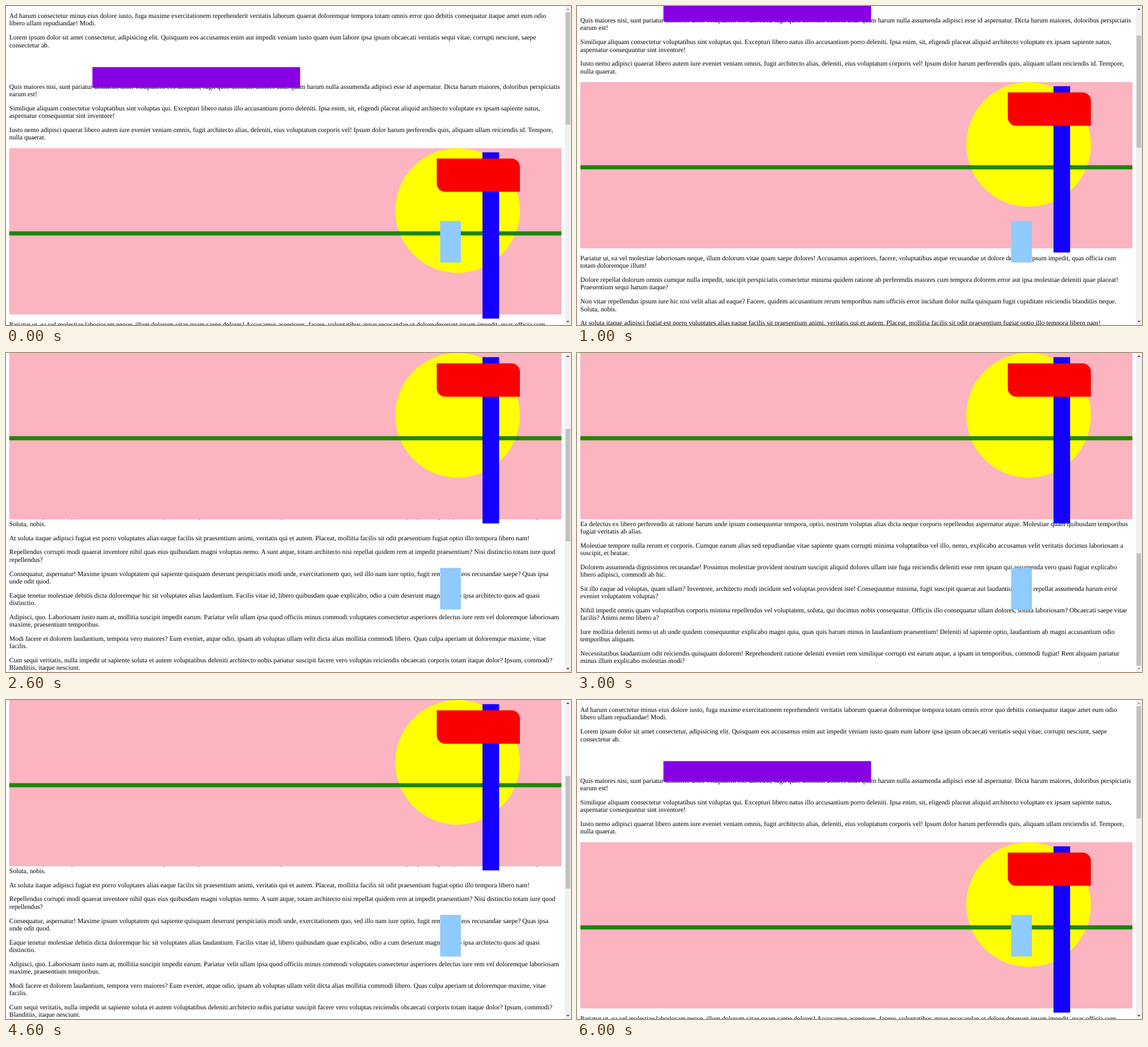
An HTML page for the animation above (7 s loop, 996 px wide and 562 px high).

```html
<!DOCTYPE html>
<html lang="la">
<head>
<meta charset="utf-8">
<title>Sticky and fixed boxes</title>
<style>
html, body { margin: 0; width: 100%; height: 100%; overflow: hidden; background: #fff; }
#stage {
  position: absolute; left: 0; top: 0; width: 1360px; height: 768px; overflow: hidden;
  transform: scale(.73235); transform-origin: 0 0;
  font: 16px/18px "Liberation Serif", "Times New Roman", serif; color: #000;
  text-rendering: geometricPrecision;
}
#page { position: absolute; left: 8px; top: 0; width: 1329px; white-space: nowrap; }
p { margin: 16px 0; }
.skip { margin-top: 484px; }
.relative { position: relative; left: 200px; top: 27px; width: 500px; height: 50px; background: #8700e3; }
.room { height: 400px; }
#sticky { position: absolute; left: 8px; top: 0; width: 1329px; height: 400px; background: #fbb4c0; }
#sticky div { position: absolute; }
.sun { right: 100px; top: 0; width: 300px; height: 300px; border-radius: 50%; background: #ff0; }
.line { left: 0; top: 200px; width: 100%; height: 10px; background: #218407; }
.post { right: 150px; top: 10px; width: 40px; height: 400px; background: #1400ff; }
.flag { right: 100px; top: 25px; width: 200px; height: 80px; border-radius: 0 20px; background: #fa0000; }
.fixed { position: absolute; left: 1045px; top: 517px; width: 50px; height: 100px; background: #8fcbfc; }
#bar { position: absolute; left: 1345px; top: 0; width: 15px; height: 768px; background: #f1f1f1; }
#thumb { position: absolute; left: 2px; top: 15px; width: 11px; height: 270px; background: #c1c1c1; }
#bar svg { position: absolute; left: 0; top: 0; }
</style>
</head>
<body>
<div id="stage">
  <div id="page">
    <p>Ad harum consectetur minus eius dolore iusto, fuga maxime exercitationem reprehenderit veritatis laborum quaerat doloremque tempora totam omnis error quo debitis consequatur itaque amet eum odio<br>libero ullam repudiandae! Modi.</p>
    <p>Lorem ipsum dolor sit amet consectetur, adipisicing elit. Quisquam eos accusamus enim aut impedit veniam iusto quam eum labore ipsa ipsum obcaecati veritatis sequi vitae, corrupti nesciunt, saepe<br>consectetur ab.</p>
    <div class="relative"></div>
    <p>Quis maiores nisi, sunt pariatur distinctio amet voluptatem eos laborum, fugit quos dolorum dolores alias quam harum nulla assumenda adipisci esse id aspernatur. Dicta harum maiores, doloribus perspiciatis<br>earum est!</p>
    <p>Similique aliquam consectetur voluptatibus sint voluptas qui. Excepturi libero natus illo accusantium porro deleniti. Ipsa enim, sit, eligendi placeat aliquid architecto voluptate ex ipsam sapiente natus,<br>aspernatur consequuntur sint inventore!</p>
    <p>Iusto nemo adipisci quaerat libero autem iure eveniet veniam omnis, fugit architecto alias, deleniti, eius voluptatum corporis vel! Ipsum dolor harum perferendis quis, aliquam ullam reiciendis id. Tempore,<br>nulla quaerat.</p>
    <div class="room"></div>
    <p>Pariatur ut, ea vel molestiae laboriosam neque, illum dolorum vitae quam saepe dolores! Accusamus asperiores, facere, voluptatibus atque recusandae ut dolore deserunt ipsum impedit, quas officia cum<br>totam doloremque illum!</p>
    <p>Dolore repellat dolorum omnis cumque nulla impedit, suscipit perspiciatis consectetur minima quidem ratione ab perferendis maiores cum tempora dolorem error aut ipsa molestiae deleniti quae placeat!<br>Praesentium sequi harum itaque?</p>
    <p>Non vitae repellendus ipsum iure hic nisi velit alias ad eaque? Facere, quidem accusantium rerum temporibus nam officiis error incidunt dolor nulla quisquam fugit cupiditate reiciendis blanditiis neque.<br>Soluta, nobis.</p>
    <p>At soluta itaque adipisci fugiat est porro voluptates alias eaque facilis sit praesentium animi, veritatis qui et autem. Placeat, mollitia facilis sit odit praesentium fugiat optio illo tempora libero nam!</p>
    <p>Repellendus corrupti modi quaerat inventore nihil quas eius quibusdam magni voluptas nemo. A sunt atque, totam architecto nisi repellat quidem rem at impedit praesentium? Nisi distinctio totam iure quod<br>repellendus?</p>
    <p>Consequatur, aspernatur! Maxime ipsum voluptatem qui sapiente quisquam deserunt perspiciatis modi unde, exercitationem quo, sed illo nam iure optio, fugit rem omnis eos recusandae saepe? Quas ipsa<br>unde odit quod.</p>
    <p>Eaque tenetur molestiae debitis dicta doloremque hic sit voluptates alias laudantium. Facilis vitae id, libero quibusdam quae explicabo, odio a cum deserunt magnam odio ipsa architecto quos ad quasi<br>distinctio.</p>
    <p>Adipisci, quo. Laboriosam iusto nam at, mollitia suscipit impedit earum. Pariatur velit ullam ipsa quod officiis minus commodi voluptates consectetur asperiores delectus iure rem vel doloremque laboriosam<br>maxime, praesentium temporibus.</p>
    <p>Modi facere et dolorem laudantium, tempora vero maiores? Eum eveniet, atque odio, ipsam ab voluptas ullam velit dicta alias mollitia commodi libero. Quas culpa aperiam ut doloremque maxime, vitae<br>facilis.</p>
    <p>Cum sequi veritatis, nulla impedit ut sapiente soluta et autem voluptatibus deleniti architecto nobis pariatur suscipit facere vero voluptas reiciendis obcaecati corporis totam itaque dolor? Ipsum, commodi?<br>Blanditiis, itaque nesciunt.</p>
    <p class="skip">Ea delectus ex libero perferendis at ratione harum unde ipsum consequuntur tempora, optio, nostrum voluptas alias dicta neque corporis repellendus aspernatur atque. Molestiae quam quibusdam temporibus<br>fugiat veritatis ab alias.</p>
    <p>Molestiae tempore nulla rerum et corporis. Cumque earum alias sed repudiandae vitae sapiente quam corrupti minima voluptatibus vel illo, nemo, explicabo accusamus velit veritatis ducimus laboriosam a<br>suscipit, et beatae.</p>
    <p>Dolorem assumenda dignissimos recusandae! Possimus molestiae provident nostrum suscipit aliquid dolores ullam iste fuga reiciendis deleniti esse rem ipsam qui assumenda vero quasi fugiat explicabo<br>libero adipisci, commodi ab hic.</p>
    <p>Sit illo eaque ad voluptas, quam ullam? Inventore, architecto modi incidunt sed voluptas provident iste! Consequuntur minima, fugit suscipit quaerat aut laudantium iusto repellat assumenda harum error<br>eveniet voluptatem voluptas?</p>
    <p>Nihil impedit omnis quam voluptatibus corporis minima repellendus vel voluptatem, soluta, qui ducimus nobis consequatur. Officiis illo consequatur ullam dolores, soluta laboriosam? Obcaecati saepe vitae<br>facilis? Animi nemo libero a?</p>
    <p>Iure mollitia deleniti nemo ut ab unde quidem consequuntur explicabo magni quia, quas quis harum minus in laudantium praesentium! Deleniti id sapiente optio, laudantium ab magni accusantium odio<br>temporibus aliquam.</p>
    <p>Necessitatibus laudantium odit reiciendis quisquam dolorem! Reprehenderit ratione deleniti eveniet rem similique corrupti est earum atque, a ipsam in temporibus, commodi fugiat! Rem aliquam pariatur<br>minus illum explicabo molestias modi?</p>
  </div>
  <div id="sticky">
    <div class="sun"></div>
    <div class="line"></div>
    <div class="post"></div>
    <div class="flag"></div>
  </div>
  <div class="fixed"></div>
  <div id="bar">
    <div id="thumb"></div>
    <svg width="15" height="768">
      <path id="up" d="M3.5 9.5h8l-4-4z"/>
      <path id="down" d="M3.5 757.5h8l-4 4z"/>
    </svg>
  </div>
</div>
<script>
const stops = [0, 159, 477, 1325, 477, 159, 0];
const STEP = 1000, MAX = 1325, TRAVEL = 467, STICKY_TOP = 342;
const $ = id => document.getElementById(id);
const moveY = (id, y) => { $(id).style.transform = `translateY(${y}px)`; };
const arrow = (id, active) => $(id).setAttribute('fill', active ? '#505050' : '#a3a3a3');

function scrollTo(y) {
  moveY('page', -y);
  moveY('sticky', Math.max(STICKY_TOP - y, 0));
  moveY('thumb', y / MAX * TRAVEL);
  arrow('up', y > 0);
  arrow('down', y < MAX);
}

const start = performance.now();
function tick() {
  const t = performance.now() - start;
  scrollTo(stops[Math.floor(t / STEP) % stops.length]);
  requestAnimationFrame(tick);
}
tick();
</script>
</body>
</html>
```
